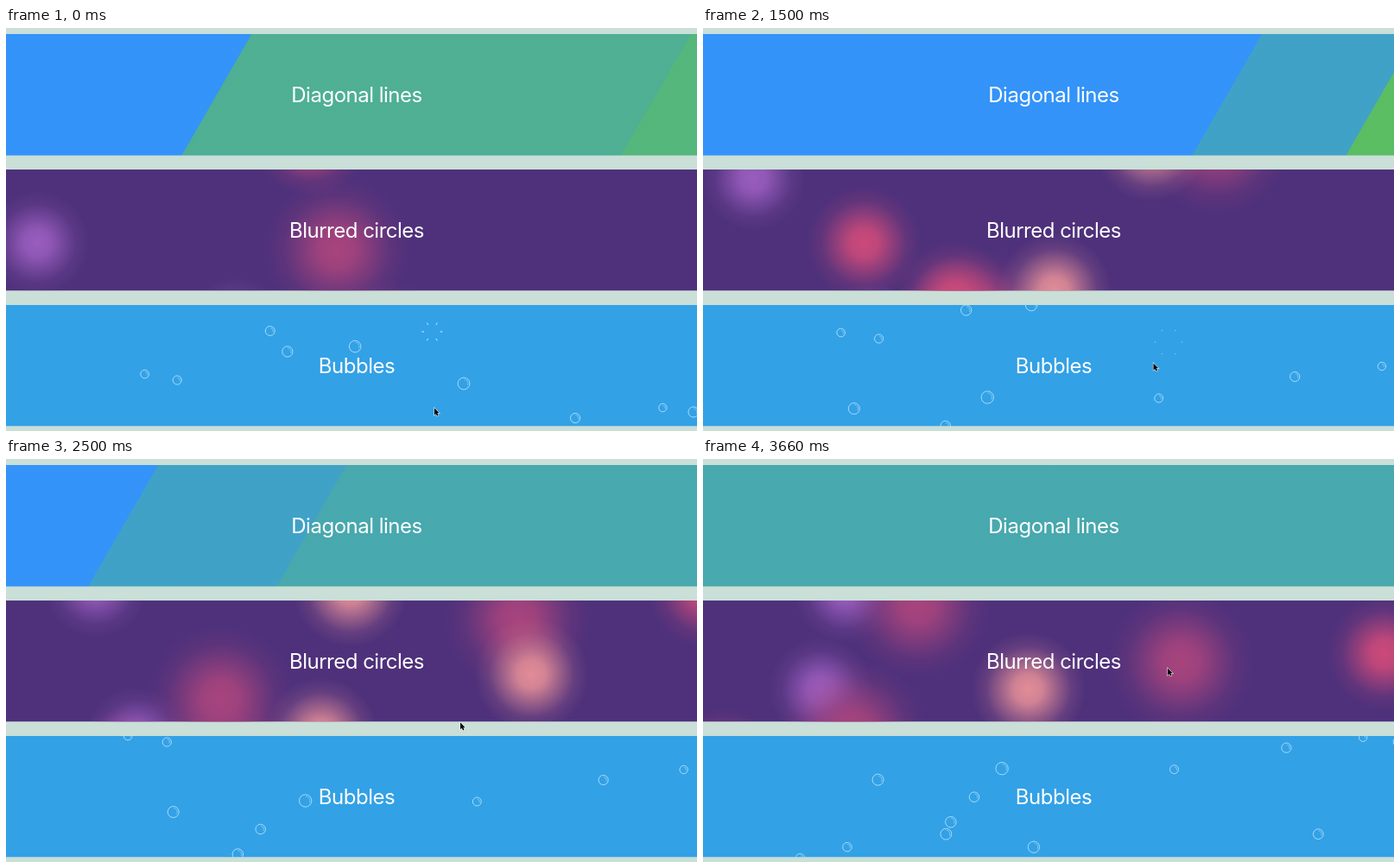
These frames come from a looping animation (800 px wide and 467 px high, 3740 ms). An HTML page with a canvas:

```html
<!DOCTYPE html>
<html lang="en">
<head>
<meta charset="utf-8">
<title>Animated backgrounds</title>
<style>
  html, body { margin: 0; width: 100%; height: 100%; overflow: hidden; background: #c9dfd7; }
  canvas { display: block; }
  div {
    position: absolute; left: 12px; width: 788px; height: 141px;
    font: 400 24px/141px Inter, "Liberation Sans", sans-serif;
    letter-spacing: -.5px; text-align: center; color: #fff;
  }
</style>
</head>
<body>
<canvas id="stage" width="800" height="467"></canvas>
<div style="top:7px">Diagonal lines</div>
<div style="top:164px">Blurred circles</div>
<div style="top:321px">Bubbles</div>
<script>
const ctx = document.getElementById('stage').getContext('2d');
const LOOP = 3740, FPS = 12, BAND = 140.5;
const rad = degrees => degrees * Math.PI / 180;

function band(top, color, draw, t) {
  ctx.save();
  ctx.beginPath();
  ctx.rect(0, top, 800, BAND);
  ctx.clip();
  ctx.fillStyle = color;
  ctx.fillRect(0, top, 800, BAND);
  draw(t);
  ctx.restore();
}

// cubic-bezier(.42, 0, .58, 1), solved by Newton's method
function easeInOut(p) {
  let s = p;
  for (let i = 0; i < 5; i++) {
    s -= (s * (1.26 + s * (-.78 + .52 * s)) - p) / (1.26 + s * (-1.56 + 1.56 * s));
  }
  return s * s * (3 - 2 * s);
}

// Three half-transparent layers slide back and forth in 3, 4 and 5 s.
function diagonals(t) {
  ctx.globalAlpha = .5;
  for (const duration of [3, 4, 5]) {
    const cycle = (t + 32.08) / duration % 2;
    const p = duration === 4 ? Math.abs(1 - cycle) : 1 - Math.abs(1 - cycle);
    const x = 406 + 1140 * (easeInOut(p) - .5);
    const split = ctx.createLinearGradient(x - 140, -3, x + 140, 158);
    split.addColorStop(.499, 'rgb(22,132,248)');
    split.addColorStop(.501, 'rgb(76,188,46)');
    ctx.fillStyle = split;
    ctx.fillRect(0, 0, 800, 160);
  }
}

const PURPLE = ['153,93,190', 60], PINK = ['204,74,122', 66];
const FAINT = ['168,68,125', 84], PEACH = ['226,141,151', 66];

// look, orbit centre, orbit radius, angle at the start
const BLOBS = [
  [PURPLE, 126, 235, 91, 171], [PURPLE, 223, 274, 87, 60],
  [FAINT, 263, 231, 123, 12], [FAINT, 398, 223, 159, 75],
  [PINK, 128, 156, 226, -7], [PINK, -17, 217, 206, -42],
  [FAINT, 505, 156, 93, -66], [PINK, 698, 160, 112, -89],
  [PEACH, 654, 215, 263, 109], [PEACH, 444, 310, 80, 88],
  [PEACH, 376, 339, 249, -106]
];

// All blobs orbit clockwise at the same rate.
function circles(t) {
  for (const [[rgb, size], cx, cy, orbit, start] of BLOBS) {
    const angle = rad(start + 34 * t);
    const x = cx + orbit * Math.cos(angle), y = cy + orbit * Math.sin(angle);
    const glow = ctx.createRadialGradient(x, y, 0, x, y, size);
    [1, .88, .5, .15, 0].forEach((a, i) => glow.addColorStop(i / 4, `rgba(${rgb},${a})`));
    ctx.fillStyle = glow;
    ctx.fillRect(x - size, y - size, 2 * size, 2 * size);
  }
}

// rightmost x, y at the start, time of bursting; listed from small to large
const BUBBLES = [
  [788, 440], [166, 401], [549, 477], [207, 408], [199, 567], [148, 580], [313, 351],
  [692, 452], [316, 509], [737, 552], [826, 445], [326, 375], [303, 538], [306, 552],
  [203, 489], [415, 567], [405, 369], [541, 412, 1.17], [500, 352, -.18], [350, 476]
];

function arc(x, y, r, from, to, alpha) {
  ctx.strokeStyle = `rgba(190,233,255,${alpha})`;
  ctx.beginPath();
  ctx.arc(x, y, r, from, to);
  ctx.stroke();
}

function burst(x, y, p) {
  const outer = 7 + 11 * p, inner = outer - 5 * (1 - p);
  ctx.strokeStyle = 'rgba(215,242,255,.9)';
  ctx.beginPath();
  for (let i = 0; i < 6; i++) {
    const c = Math.cos(rad(60 * i)), s = Math.sin(rad(60 * i));
    ctx.moveTo(x + inner * c, y + inner * s);
    ctx.lineTo(x + outer * c, y + outer * s);
  }
  ctx.stroke();
}

// Bubbles rise steadily along a sine path.
function bubbles(t) {
  ctx.lineWidth = 1;
  BUBBLES.forEach(([right, y0, pop = Infinity], i) => {
    const y = y0 - 32 * t;
    const x = right - 18 * (1 - Math.cos((y - 378) * .0344));
    const r = 4.7 + .13 * i;
    const p = (t - pop) / .4;
    if (p < 0) {
      arc(x, y, r, 0, 7, .8);
      arc(x, y, r - 2, -1.5, .5, .5);
    } else if (p < 1) {
      burst(x, y, p);
    }
  });
}

// time, x, y of the pointer tip
const POINTER = [
  [0, 495.5, 440], [.5, 548, 399], [1, 541.5, 375], [1.5, 521, 388],
  [2.16, 515.5, 357], [2.91, 537.5, 242], [4, 537.5, 242]
];
const ARROW = new Path2D('M.5 .5V8.5L2.3 6.9L3.5 9.6L5 9L3.8 6.3H6.2Z');

function pointer(t) {
  const i = POINTER.findIndex(key => key[0] > t);
  const [t0, x0, y0] = POINTER[i - 1], [t1, x1, y1] = POINTER[i];
  const u = (t - t0) / (t1 - t0);
  ctx.save();
  ctx.translate(x0 + u * (x1 - x0), y0 + u * (y1 - y0));
  ctx.strokeStyle = 'rgba(255,255,255,.8)';
  ctx.lineWidth = 1.2;
  ctx.stroke(ARROW);
  ctx.fillStyle = '#000';
  ctx.fill(ARROW);
  ctx.restore();
}

function render(now) {
  const t = Math.floor((now % LOOP + 6.7) * FPS / 1000) / FPS;
  ctx.fillStyle = '#c9dfd7';
  ctx.fillRect(0, 0, 800, 467);
  band(7, '#fff', diagonals, t);
  band(164, '#4f317b', circles, t);
  band(321, '#33a1e6', bubbles, t);
  pointer(t);
}

const begin = performance.now();
function tick() {
  render(performance.now() - begin);
  requestAnimationFrame(tick);
}
tick();
</script>
</body>
</html>
```
